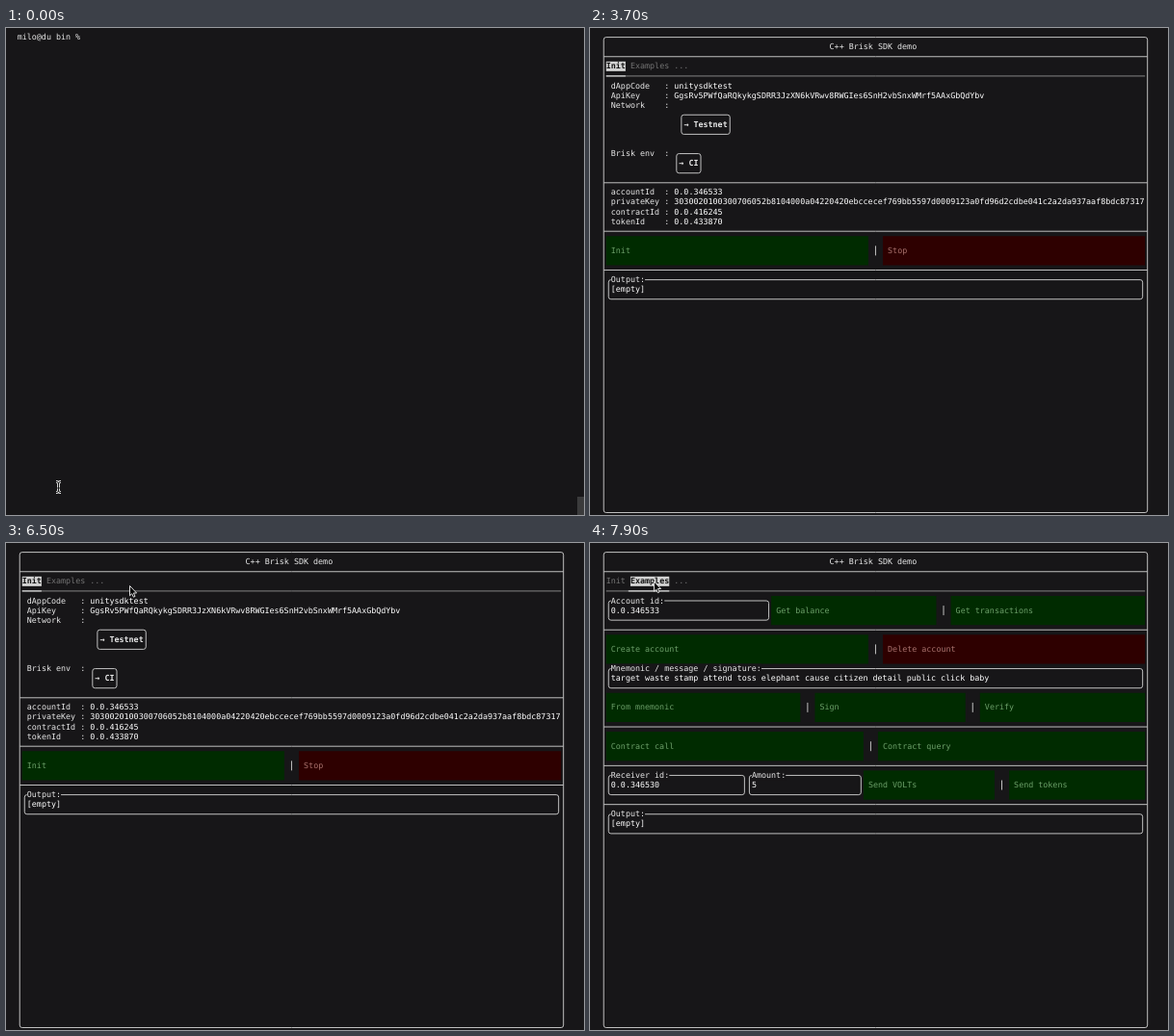
Recreate the animation shown at these times as an HTML page with a canvas. Size 600x506 px, loop 8000 ms.

```html
<!DOCTYPE html>
<html lang="en">
<head>
<meta charset="utf-8">
<title>Terminal demo</title>
<style>
html, body { margin: 0; width: 100%; height: 100%; overflow: hidden; background: #171618; }
canvas { display: block; }
</style>
</head>
<body>
<canvas id="stage" width="600" height="506"></canvas>
<script>
const ctx = document.getElementById('stage').getContext('2d');
const LOOP = 8000, CW = 5.04, RH = 10.08;
const BG = '#171618', LINE = '#c0c0c0', TEXT = '#e8e8e8', VALUE = '#ffffff', DIM = '#747474';
const GREEN = ['#002b00', '#6c9f69'], RED = ['#2e0000', '#a8716c'];

// Character grid: left edge and middle of a column, centre line of a row
const colX = c => 11.7 + c * CW;
const midX = c => colX(c) + CW / 2;
const rowY = r => 9.6 + r * RH;

function cells(c, r, w, h, color) {
  ctx.fillStyle = color;
  ctx.fillRect(colX(c), rowY(r) - RH / 2, w * CW, h * RH);
}
function text(c, r, str, color = TEXT, bold = false) {
  ctx.font = (bold ? 'bold ' : '') + '8.37px "DejaVu Sans Mono", monospace';
  ctx.fillStyle = color;
  ctx.fillText(str, colX(c), rowY(r) + 2.5);
}
function line(x1, y1, x2, y2, color = LINE) {
  ctx.strokeStyle = color;
  ctx.lineWidth = 1;
  ctx.beginPath();
  ctx.moveTo(x1, y1);
  ctx.lineTo(x2, y2);
  ctx.stroke();
}
function box(c1, r1, c2, r2) {
  ctx.strokeStyle = LINE;
  ctx.lineWidth = 1;
  ctx.beginPath();
  ctx.roundRect(midX(c1), rowY(r1), midX(c2) - midX(c1), rowY(r2) - rowY(r1), 2.5);
  ctx.stroke();
}
function field(c1, r, c2, label, value) {
  box(c1, r, c2, r + 2);
  cells(c1 + 1, r, label.length, 1, BG);
  text(c1 + 1, r, label);
  text(c1 + 1, r + 1, value, VALUE);
}
function choice(c, r, label) {
  box(c, r, c + label.length + 1, r + 2);
  text(c + 1, r + 1, label, TEXT, true);
}
const rule = r => line(midX(0), rowY(r), midX(112), rowY(r));

// A row of buttons: [first column, end column, label, colours]
function buttons(r, list) {
  list.forEach(([c1, c2, label, [bg, fg] = GREEN], i) => {
    cells(c1, r, c2 - c1, 3, bg);
    text(c1 + 1, r + 1, label, fg);
    if (i) line(midX(c1 - 2), rowY(r + 1) - 5, midX(c1 - 2), rowY(r + 1) + 5);
  });
}

function shell(t) {
  const prompt = 'milo@du bin % ', command = './demo-application ';
  const keys = [1600, 2000, 2500, 2700, 2900];
  const typed = t >= 3100 ? command.length : keys.filter(k => t >= k).length;
  text(0, 0, prompt + command.slice(0, typed));
  if (t >= 1300 || (t >= 100 && t < 700)) {
    ctx.fillStyle = '#b4b4b4';
    ctx.fillRect(Math.floor(colX(prompt.length + typed)), 4, 1, 11);
  }
  ctx.fillStyle = '#3b3b3c';
  ctx.fillRect(593, 487, 7, 19);
  if (t < 1600) ibeam(54.5, 477);
}

function tab(c, label, selected, hovered) {
  if (hovered) cells(c, 3, label.length, 1, '#d2d2d2');
  text(c, 3, label, hovered ? '#141414' : selected ? TEXT : DIM, selected);
}

const quintic = u => {
  u = Math.min(1, Math.max(0, u));
  return u < .5 ? 16 * u ** 5 : 1 - 16 * (1 - u) ** 5;
};

function header(t, examples) {
  box(0, 0, 112, 49);
  text(47, 1, 'C++ Brisk SDK demo');
  rule(2);
  const hover = t >= 7000;
  tab(1, 'Init', !examples, !hover);
  tab(6, 'Examples', examples, hover);
  text(15, 3, '...', DIM);
  // The underline's right edge leads, its left edge follows
  const left = 1 + 4.6 * quintic((t - 7695) / 250);
  const right = 5 + 9 * quintic((t - 7540) / 250);
  line(colX(1), rowY(4), colX(112), rowY(4), '#858585');
  line(colX(left), rowY(4), colX(right), rowY(4), '#f2f2f2');
}

function output(r) {
  rule(r - 1);
  field(1, r, 111, 'Output:', '[empty]');
}

function initView() {
  const pairs = [
    [5, 'dAppCode', 'unitysdktest'],
    [6, 'ApiKey', 'GgsRv5PWfQaRQkykgSDRR3JzXN6kVRwv8RWGIes6SnH2vbSnxWMrf5AAxGbQdYbv'],
    [7, 'Network', ''],
    [12, 'Brisk env', ''],
    [16, 'accountId', '0.0.346533'],
    [17, 'privateKey', '3030020100300706052b8104000a04220420ebccecef769bb5597d0009123a0fd96d2cdbe041c2a2da937aaf8bdc87317'],
    [18, 'contractId', '0.0.416245'],
    [19, 'tokenId', '0.0.433870']
  ];
  for (const [r, name, value] of pairs) {
    text(2, r, name.padEnd(11) + ':');
    text(15, r, value, VALUE);
  }
  choice(16, 8, '→ Testnet');
  choice(15, 12, '→ CI');
  rule(15);
  rule(20);
  buttons(21, [[1, 55, 'Init'], [58, 112, 'Stop', RED]]);
  output(25);
}

function examplesView() {
  field(1, 5, 34, 'Account id:', '0.0.346533');
  buttons(5, [[35, 69, 'Get balance'], [72, 112, 'Get transactions']]);
  rule(8);
  buttons(9, [[1, 55, 'Create account'], [58, 112, 'Delete account', RED]]);
  field(1, 12, 111, 'Mnemonic / message / signature:',
    'target waste stamp attend toss elephant cause citizen detail public click baby');
  buttons(15, [[1, 41, 'From mnemonic'], [44, 75, 'Sign'], [78, 112, 'Verify']]);
  rule(18);
  buttons(19, [[1, 54, 'Contract call'], [57, 112, 'Contract query']]);
  rule(22);
  field(1, 23, 29, 'Receiver id:', '0.0.346530');
  field(30, 23, 53, 'Amount:', '5');
  buttons(23, [[54, 81, 'Send VOLTs'], [84, 112, 'Send tokens']]);
  output(27);
}

function ibeam(x, y) {
  const p = new Path2D('M-2.5-5.5Q0-5.5 0-4Q0-5.5 2.5-5.5M0-4V4M-2.5 5.5Q0 5.5 0 4Q0 5.5 2.5 5.5M-1.5 1H1.5');
  ctx.save();
  ctx.translate(x, y);
  for (const [w, color] of [[2.8, '#e8e8e8'], [1, '#101010']]) {
    ctx.lineWidth = w;
    ctx.strokeStyle = color;
    ctx.stroke(p);
  }
  ctx.restore();
}

// Pointer path: [time, x, y]
const path = [
  [5000, 56, 471], [5200, 74, 402], [5400, 103, 290], [5600, 132, 180],
  [5700, 139, 149.5], [6000, 139, 149.5], [6200, 137, 118], [6400, 131, 60],
  [6500, 128, 44], [6700, 110, 40], [6900, 84, 39.5], [7100, 68, 39.5], [7300, 66, 39.5]
];
function pointer(t) {
  if (t < path[0][0]) return;
  const i = path.findIndex(p => p[0] > t);
  let [, x, y] = path[path.length - 1];
  if (i > 0) {
    const [t0, x0, y0] = path[i - 1], [t1, x1, y1] = path[i];
    const u = (t - t0) / (t1 - t0);
    x = x0 + (x1 - x0) * u;
    y = y0 + (y1 - y0) * u;
  }
  const arrow = new Path2D('M.5 .5V10.8L2.7 8.7L4.4 12.2L6 11.4L4.4 8H7.6Z');
  ctx.save();
  ctx.translate(x, y);
  ctx.lineWidth = 1;
  ctx.strokeStyle = '#dcdcdc';
  ctx.fillStyle = '#050505';
  ctx.fill(arrow);
  ctx.stroke(arrow);
  ctx.restore();
}

function draw(now) {
  const t = Math.floor(now % LOOP / 100) * 100;
  ctx.textRendering = 'geometricPrecision';
  ctx.fillStyle = BG;
  ctx.fillRect(0, 0, 600, 506);
  if (t < 3700) {
    shell(t);
  } else {
    const examples = t >= 7600;
    header(t, examples);
    if (examples) examplesView();
    else initView();
    pointer(t);
  }
  requestAnimationFrame(draw);
}
requestAnimationFrame(draw);
</script>
</body>
</html>
```
